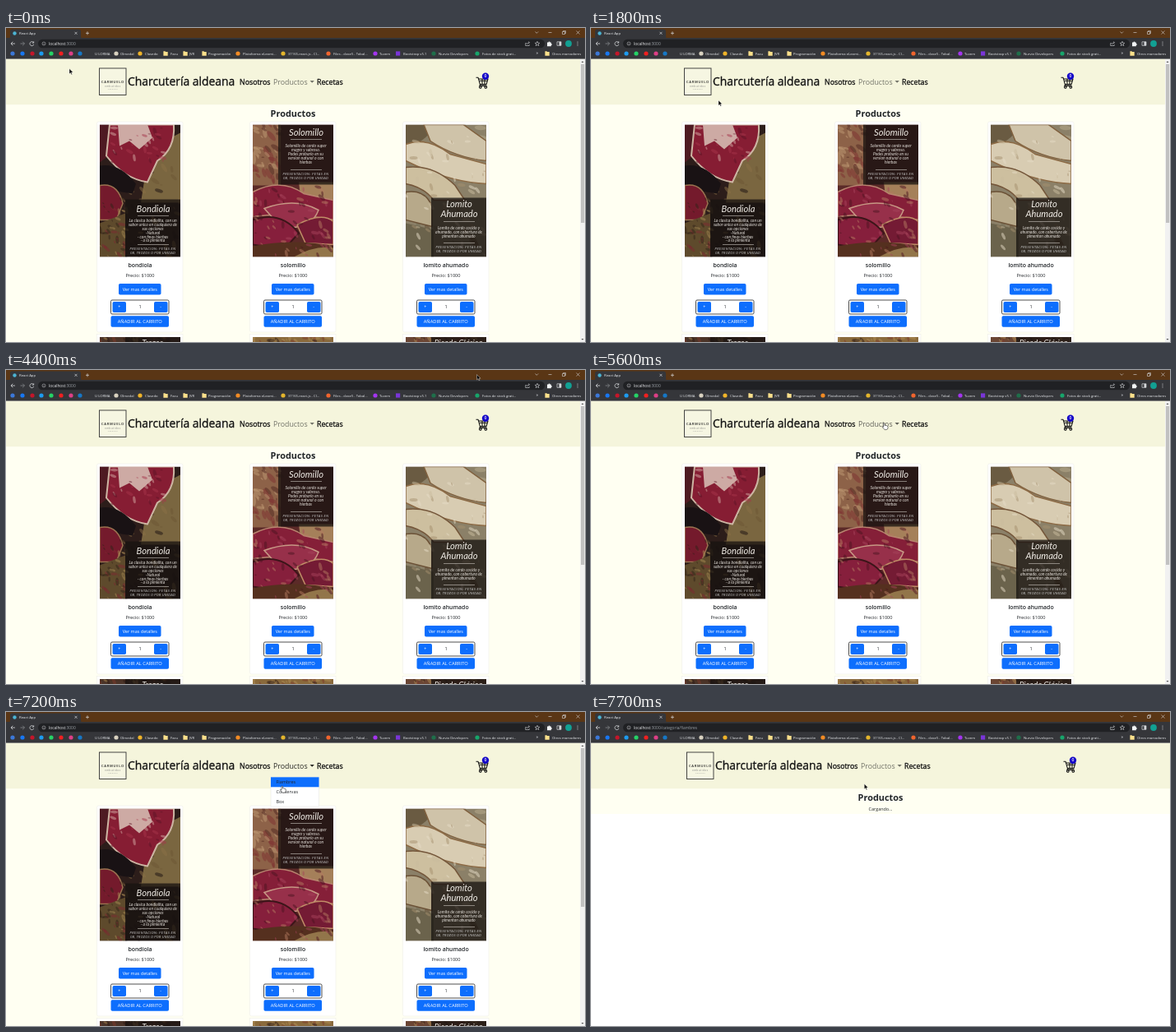
Animation, 704 px wide and 382 px high, one loop 8000 ms. Source, as an HTML page:

```html
<!DOCTYPE html>
<html lang="es">
<head>
<meta charset="utf-8">
<title>React App</title>
<style>
  html, body { margin: 0; width: 100%; height: 100%; overflow: hidden; background: #fff; }
  svg { display: block; }
  text { font-family: 'Open Sans', sans-serif; white-space: pre; }
  .medium { stroke: #111; stroke-width: .3px; }
  .flyer text { font-family: Lato, sans-serif; font-style: italic; }
</style>
</head>
<body>
<svg id="stage" width="704" height="382" viewBox="0 0 704 382"></svg>
<script>
const LOOP = 8000, STEP = 100;
const BLUE = '#0d6efd', INK = '#212529', IVORY = '#fffff2';

// Drawing helpers: each returns SVG markup
const rect = (x, y, w, h, fill, more = '') =>
  `<rect x="${x}" y="${y}" width="${w}" height="${h}" fill="${fill}" ${more}/>`;
const dot = (x, y, r, fill) => `<circle cx="${x}" cy="${y}" r="${r}" fill="${fill}"/>`;
const shape = (d, fill, more = '') => `<path d="${d}" fill="${fill}" ${more}/>`;
const line = (d, color, width = 0.8) =>
  `<path d="${d}" fill="none" stroke="${color}" stroke-width="${width}" stroke-linejoin="round"/>`;
const text = (x, y, str, size, fill = INK, more = '') =>
  `<text x="${x}" y="${y + size * 0.36}" font-size="${size}" fill="${fill}" ${more}>${str}</text>`;
const mid = (x, y, str, size, fill, more = '') =>
  text(x, y, str, size, fill, 'text-anchor="middle" ' + more);
const edged = (d, fill, edge, width = 1.5) => shape(d, fill, `stroke="${edge}" stroke-width="${width}"`);

let seed = 7;
const rand = () => (seed = seed * 16807 % 2147483647) / 2147483647;

function scatter(count, x, y, w, h, size, colors) {
  let out = '';
  for (let i = 0; i < count; i++) {
    const cx = (x + rand() * w).toFixed(1), cy = (y + rand() * h).toFixed(1);
    const r = size * (0.3 + rand()), color = colors[Math.floor(rand() * colors.length)];
    out += `<ellipse cx="${cx}" cy="${cy}" rx="${r.toFixed(1)}" ry="${(r * 0.4).toFixed(1)}" fill="${color}"
      opacity=".5" transform="rotate(${Math.floor(rand() * 90)} ${cx} ${cy})"/>`;
  }
  return out;
}

const folder = x => shape(`M${x - 2.6} 28.3h2l.7.8h2.6v4.6h-5.3z`, '#fbe08b');

function browserChrome() {
  const label = '#e8eaed', icon = '#d5d7da';
  const circles = [[8, '#3c78d8'], [20, '#1877f2'], [32, '#c4162a'], [43, '#1d9bf0'], [55, '#25d366'],
    [67, '#f02020'], [79, '#dd3f86'], [90, '#1677c5'], [134, '#d9d2c0'], [163, '#f0b429'],
    [282, '#f28b24'], [337, '#e4b52c'], [392, '#f0642d'], [449, '#a435f0'], [520, '#1f6f4a'], [573, '#17a56b']];
  const bookmarks = [[108, 'U LORMA'], [139, 'Olmedal'], [169, 'Clasedo'], [200, 'Facu'], [223, 'JVR'],
    [246, 'Programación'], [288, 'Plataforma eLearni...'], [343, '31165-react-js - Cl...'],
    [398, 'Files - clase5 - Tobal...'], [454, 'Tuvem'], [483, 'Bootstrap v5.1'],
    [526, 'Nurvio Developers'], [579, 'Fotos de stock grati...'], [664, 'Otros marcadores']];
  return rect(0, 0, 704, 13, '#5a3615') +
    shape('M3 13Q5 13 5 10V4Q5 1.5 7.5 1.5H88Q91 1.5 91 4V10Q91 13 94 13z', '#35363a') +
    rect(0, 12, 704, 25.6, '#35363a') +
    dot(10.5, 6.5, 2.2, '#4cb4d4') + text(16, 6.3, 'React App', 4.3, label) +
    line('M83.5 4.8l3 3m0-3l-3 3M97 6.3h4m-2-2v4', icon, 0.7) +
    line('M643.5 4.5l1.8 1.8 1.8-1.8M659.5 5.5h4M676.5 4.5h3v3h-3zM677.5 4.5v-1h3v3h-1M693.5 3.5l4 4m0-4l-4 4', icon, 0.6) +
    line('M11 19H6m2.3-2.3L6 19l2.3 2.3M33.5 17.7a2.5 2.5 0 1 0 .3 2.3M33.7 16.3v1.8h-1.8', icon) +
    line('M17.5 19h5m-2.3-2.3L22.5 19l-2.3 2.3', '#85878b') +
    rect(39, 13.8, 616, 10.4, '#202124', 'rx="5.2"') +
    line('M44 19a2 2 0 1 0 4 0a2 2 0 1 0-4 0M46 18.8v1.2', icon, 0.5) +
    text(52, 19, 'localhost<tspan fill="#9aa0a6">:3000<tspan id="route"></tspan></tspan>', 4.85, label) +
    line('M633 18.5h-1.3v3h4.5v-1.5M633.5 20q.3-2.3 3-2.3m-1.2-1.2l1.2 1.2-1.2 1.2', icon, 0.6) +
    line('M646 16.3l.8 1.9 2 .1-1.6 1.3.6 2-1.8-1.1-1.8 1.1.6-2-1.6-1.3 2-.1z', icon, 0.6) +
    shape('M658 17.5h1.5a1 1 0 0 1 2 0h1.3v1.5a1 1 0 0 1 0 2v1.3H658z', '#f1f3f4') +
    line('M670 16.8h5v4.5h-5z', icon, 0.7) + rect(672.5, 16.8, 2.5, 4.5, icon) +
    dot(684, 19, 3.9, '#12a093') + [17, 19, 21].map(y => dot(695, y, 0.55, icon)).join('') +
    circles.map(([x, c]) => dot(x, 31, 2.6, c)).join('') +
    rect(474, 28.4, 5.2, 5.2, '#7a35d8') +
    [194, 218, 241, 658].map(folder).join('') +
    bookmarks.map(([x, s]) => text(x, 31.1, s, 4.2, label)).join('') +
    text(644.5, 30.5, '»', 5, label);
}

function header(linkId) {
  const medium = 'class="medium"';
  return rect(-5, 37.6, 712, 55.6, '#f5f5dc') +
    rect(113.5, 49, 32.5, 32.5, '#f6f6e2', 'stroke="#333" stroke-width=".9"') +
    mid(130, 65.3, 'CARMUELO', 4.1, '#222', 'font-weight="600" letter-spacing=".7"') +
    mid(130, 70.7, 'embutidos', 2.6, '#777', 'letter-spacing=".7"') +
    mid(130, 74, 'caseros', 2.4, '#888', 'letter-spacing=".6"') +
    text(148, 65, 'Charcutería aldeana', 13.9, '#111', medium) +
    text(284, 65.8, 'Nosotros', 8.8, '#111', medium) +
    `<g id="${linkId}" fill="#74756a">${text(325, 65.8, 'Productos', 8.8, 'inherit')}` +
    '<path d="M369.5 64h5.4l-2.7 2.8z"/></g>' +
    text(378, 65.8, 'Recetas', 8.8, '#111', medium) +
    line('M571.5 60.3h2.6l2.3 8.3h7.6l2-6.6h-11.3M576.5 68.6l-.6 1.8h8.6M576 64.3h9M579 62v6.5M582 62v6.5', '#111', 1.1) +
    line('M575.5 72a1.3 1.3 0 1 0 2.6 0a1.3 1.3 0 1 0-2.6 0M582 72a1.3 1.3 0 1 0 2.6 0a1.3 1.3 0 1 0-2.6 0', '#111', 1.1) +
    dot(583, 58.7, 4.2, '#1405c8') + mid(583, 58.6, '0', 5, '#fff', 'font-weight="600"') +
    mid(349, 104, 'Productos', 10.9, INK, 'font-weight="700"');
}

// Flyer pictures, in a 98 x 161 box
const pictures = [
  () => rect(0, 0, 98, 161, '#2c1d1a') +
    shape('M60 30L98 10V95H50z', '#7a6640') +
    scatter(60, 0, 40, 98, 121, 5, ['#6b5533', '#1a1010', '#8a7046']) +
    shape('M0 0H20L8 40 0 46z', '#4e1a22') +
    edged('M12 0H90Q92 30 70 44L58 70Q30 66 8 38z', '#861d33', '#cdb5a3', 2) +
    shape('M22 0H58L64 16 48 30 36 20 24 26z', '#cdaaa4') +
    scatter(30, 14, 4, 66, 42, 4, ['#a6344a', '#5c1325', '#d3aaa3']) +
    shape('M0 50Q24 46 44 72L40 84 0 78z', '#191214') +
    edged('M0 74Q22 70 28 96L20 116H0z', '#741a2c', '#9b7350') +
    shape('M0 120L31 108V161H0z', '#5e4a2c') +
    scatter(45, 0, 84, 34, 76, 4, ['#a58a52', '#2f2118', '#7c2730']),
  () => rect(0, 0, 98, 161, '#5b2a28') +
    shape('M0 0H34V74H0z', '#8d6248') +
    scatter(40, 0, 0, 34, 74, 6, ['#c09a74', '#50251f', '#7d3030']) +
    shape('M56 70H98V92L58 88z', '#a5805a') +
    edged('M0 82Q34 64 62 84L98 92V116Q46 106 0 112z', '#851f38', '#b98670') +
    edged('M14 102Q52 88 80 104Q70 130 34 124z', '#97304a', '#c79884') +
    edged('M0 116Q34 104 56 132L38 152 0 146z', '#861f3c', '#3c1519', 2) +
    edged('M54 122Q84 106 98 118V146L64 144z', '#741b34', '#c08d67') +
    shape('M0 148Q50 138 98 148V161H0z', '#55301f') +
    shape('M50 161Q76 146 98 150V161z', '#92754a') +
    scatter(70, 0, 76, 98, 84, 4, ['#a6425a', '#4b1420', '#b47a60']),
  () => rect(0, 0, 98, 161, '#8b8068') +
    scatter(45, 0, 0, 98, 161, 6, ['#5f4a31', '#b9ab8e', '#6f6a52']) +
    shape('M0 0H36Q26 20 0 30z', '#6a5b42') +
    edged('M22 0H70L98 20V44Q60 40 30 20z', '#cfc3a9', '#80613f') +
    edged('M0 24Q26 14 54 36L98 48V72Q52 70 0 44z', '#d8ccb2', '#8c6a45') +
    edged('M0 52Q34 48 60 74L72 92H34Q22 76 0 72z', '#cdbf9f', '#74563a') +
    edged('M0 82Q24 78 32 100V124L0 116z', '#b7a98a', '#6b5136') +
    shape('M0 120L34 128V161H0z', '#6b634c') +
    scatter(55, 0, 10, 98, 140, 4, ['#e6dcc6', '#a58f6e', '#c9bb9e'])
];

const products = [
  { name: 'bondiola', box: [31, 91, 67, 70], titles: [[102, 'Bondiola']], rules: [111, 146], top: 117,
    notes: ['La clasica bondiolita, con un', 'sabor unico en cualquiera de', 'sus opciones', '-Natural', '- con finas hierbas', '- a la pimienta'] },
  { name: 'solomillo', box: [31, 0, 67, 73], titles: [[9.5, 'Solomillo']], rules: [18, 55], top: 26,
    notes: ['Solomillo de cerdo super', 'magro y sabroso.', 'Podes probarlo en su', 'version natural o con', 'hierbas'] },
  { name: 'lomito ahumado', box: [31, 89, 67, 72], titles: [[96.5, 'Lomito'], [108.5, 'Ahumado']], rules: [118, 144], top: 126,
    notes: ['Lomito de cerdo cocido y', 'ahumado, con cobertura de', 'pimenton ahumado'] }
];

function flyer(p, i) {
  const foot = p.rules[1] + 5.5;
  return `<svg class="flyer" x="${114 + 186 * i}" y="117.5" width="98" height="161">` +
    `<g filter="url(#soft)">${pictures[i]()}</g>` +
    rect(...p.box, '#181311', 'opacity=".76"') +
    p.titles.map(([y, s]) => mid(65, y, s, 11.2, '#f0ece6')).join('') +
    p.rules.map(y => line(`M46 ${y}h38`, '#c9c4be', 0.6)).join('') +
    p.notes.map((s, n) => mid(64.5, p.top + n * 4.8, s, 5, '#e6e2dc')).join('') +
    mid(64.5, foot, 'PRESENTACION: FETAS EN', 4, '#ccc', 'letter-spacing=".45"') +
    mid(64.5, foot + 4.6, 'GR, TROZOS O POR UNIDAD', 4, '#ccc', 'letter-spacing=".25"') + '</svg>';
}

const button = (x, y, w, h, label, size) =>
  rect(x, y, w, h, BLUE, 'rx="1.8"') + mid(x + w / 2, y + h / 2 - 0.1, label, size, '#fff');

function card(p, i) {
  const x = 163 + 186 * i;
  return rect(x - 52.5, 114, 104.5, 256, '#fff', 'rx="2" stroke="#efefe8" stroke-width=".6"') + flyer(p, i) +
    mid(x, 289, p.name, 6.9, INK, 'font-weight="600"') +
    mid(x, 300.5, 'Precio: $1000', 5.6) +
    button(x - 26, 311, 51.5, 13.5, 'Ver mas detalles', 5.5) +
    rect(x - 35.5, 331, 70.5, 17, '#fff', 'rx="1.5" stroke="#222" stroke-width=".8"') +
    button(x - 33.5, 333, 16.5, 13, '+', 5.5) + mid(x, 339.5, '1', 5.5) +
    button(x + 17, 333, 16.5, 13, '-', 5.5) +
    button(x - 35.5, 350.3, 70.5, 13.5, 'AÑADIR AL CARRITO', 5.75);
}

function nextRow() {
  const tones = ['#4b3428', '#8a6a3c', '#6b4634'], names = ['Trozos', '', 'Picada Clásica'];
  return names.map((name, i) => {
    const x = 114 + 186 * i;
    return rect(x - 3.5, 372.5, 104.5, 12, '#fff', 'stroke="#efefe8" stroke-width=".6"') +
      `<svg class="flyer" x="${x}" y="376" width="98" height="6">` + rect(0, 0, 98, 6, tones[i]) +
      scatter(24, 0, 0, 98, 6, 4, ['#2a1814', '#b08d55', '#7d3a2c']) +
      (name && rect(31, 0, 67, 6, '#181311', 'opacity=".76"') + mid(64, 6, name, 9.8, '#f0ece6')) + '</svg>';
  }).join('');
}

const home = rect(0, 37.6, 704, 344.4, IVORY) + header('link') + products.map(card).join('') + nextRow() +
  rect(698, 37.6, 6, 344.4, '#f1f1f1') + rect(699, 44, 4.2, 193, '#c1c1c1') +
  shape('M699.5 42l1.5-1.8 1.5 1.8zM699.5 378l1.5 1.8 1.5-1.8z', '#555') +
  '<g id="menu">' + rect(322, 79, 58.5, 36, '#fff', 'stroke="#ddd" stroke-width=".4"') +
  rect(322, 79.3, 58.5, 12, '#e9ecef', 'id="item"') +
  ['Fiambres', 'Conservas', 'Box'].map((s, i) => text(328.5, 85.3 + 11.9 * i, s, 5.5)).join('') + '</g>';

const loading = rect(0, 37.6, 704, 344.4, '#fff') + rect(0, 93, 704, 31, IVORY) +
  `<g transform="translate(3)">${header('otherLink')}</g>` + mid(352, 118, 'Cargando...', 5.45);

const arrow = shape('M0 0V6.3L1.5 5 2.5 7.2 3.5 6.7 2.5 4.6H4.5z', '#000', 'stroke="#fff" stroke-width=".4"');
const hand = shape('M-.8 .6Q0-.6.8.6V3.2Q2 2.6 2.3 3.6 3.5 3 3.8 4 5 3.8 5 5V6.5Q5 8.8 3 9H.7Q-1 7.8-2.8 5-2.4 3.8-.8 5.2z',
  '#fff', 'stroke="#111" stroke-width=".6" transform="scale(.9)"');

const $ = id => document.getElementById(id);
const show = (id, on) => $(id).setAttribute('display', on ? 'inline' : 'none');

$('stage').innerHTML = '<filter id="soft"><feGaussianBlur stdDeviation=".7"/></filter>' +
  `<g id="home">${home}</g><g id="loading">${loading}</g>` + browserChrome() +
  `<g id="cursor"><g id="arrow">${arrow}</g><g id="hand">${hand}</g></g>`;

// Pointer path: time, x, y
const path = [[0, 77, 49.5], [500, 71, 57], [700, 71, 57], [1000, 88, 74], [1500, 128, 85], [1800, 155, 88],
  [2200, 699, 6], [2300, 720, 14], [3200, 720, 14], [3300, 702.5, 13.5], [3500, 702.5, 13.5],
  [4400, 572.5, 5.6], [5300, 398, 60], [5600, 356.5, 64.5], [6200, 354, 66], [6500, 354, 66],
  [6700, 335.8, 90], [7600, 335.8, 90], [7700, 332.3, 87.5], [LOOP, 332.3, 87.5]];

function pointer(t) {
  const i = path.findIndex(k => k[0] > t);
  const [t0, x0, y0] = path[i - 1], [t1, x1, y1] = path[i];
  const u = (t - t0) / (t1 - t0);
  return `translate(${x0 + (x1 - x0) * u} ${y0 + (y1 - y0) * u})`;
}

function draw() {
  const t = Math.floor(performance.now() % LOOP / STEP) * STEP;
  const isLoading = t >= 7300, overLink = t >= 5500 && t < 7700;
  show('home', !isLoading);
  show('loading', isLoading);
  show('menu', t >= 6300);
  show('item', t >= 6700);
  $('item').setAttribute('fill', t >= 7200 ? BLUE : '#e9ecef');
  $('link').setAttribute('fill', t >= 6300 ? '#2a2a26' : overLink ? '#62625a' : '#74756a');
  $('route').textContent = isLoading ? '/categoria/fiambres' : '';
  show('arrow', !overLink);
  show('hand', overLink);
  $('cursor').setAttribute('transform', pointer(t));
  requestAnimationFrame(draw);
}
draw();
</script>
</body>
</html>
```
